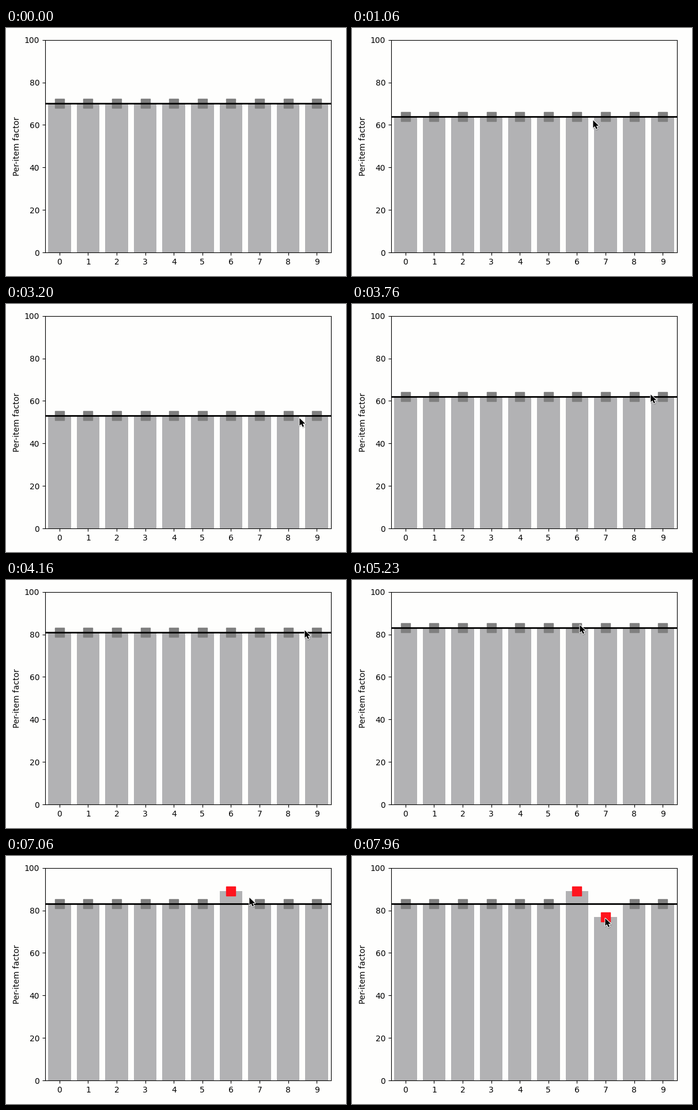
Recreate the animation shown at these times as a matplotlib script. Size 590x431 px, loop 8 s.

```python
import matplotlib.pyplot as plt
import numpy as np
from matplotlib.animation import FuncAnimation
from matplotlib.patches import Polygon

W, H, DPI = 590, 431, 100
LOOP, STEP = 8000, 20
PAPER, BAR, GREY, RED = "#fefefd", "#b2b2b4", "#808080", "#ff141e"

# Pointer path: time in ms, x, y in pixels from the top left
POINTER = np.array([
    (150, 600, 176), (200, 572, 174), (280, 500, 162), (360, 440, 144),
    (460, 417, 130), (600, 417, 130), (740, 417, 126), (860, 417, 133),
    (1060, 417, 159), (1300, 414, 186), (1360, 414, 190), (1930, 414, 190),
    (2000, 412, 190.6), (2330, 412, 190.6), (2450, 410, 196), (2600, 418, 208),
    (2750, 448, 216), (2900, 482, 213), (3130, 508, 197), (3200, 508, 197),
    (3450, 513, 190), (3760, 517, 156), (4000, 517, 107), (4110, 517, 89),
    (4230, 517, 81), (4560, 517, 81), (4660, 511, 84), (4850, 470, 90),
    (5030, 420, 86), (5230, 393, 77), (5360, 392, 76), (5400, 392, 76),
    (5700, 392, 72), (6000, 395, 60), (6160, 396, 57), (6490, 396, 57),
    (6500, 397, 57), (6860, 397, 57), (6940, 404, 61), (7060, 421, 71),
    (7200, 432, 82), (7460, 438, 91), (7700, 438, 91), (7960, 438, 107),
])

# Dragged values: time in ms, value
LEVEL = np.array([
    (600, 70), (700, 70.7), (780, 70.7), (860, 70), (960, 67.5), (1060, 64),
    (1200, 58.5), (1300, 55), (1360, 54), (1450, 54), (1460, 53),
    (3200, 53), (3240, 51), (3330, 51), (3480, 53), (3620, 57), (3760, 62),
    (4000, 72), (4110, 78.5), (4190, 82), (4230, 83),
])
SINGLE = {
    6: np.array([(5400, 83), (5440, 84), (5700, 85), (6000, 88), (6140, 89)]),
    7: np.array([(7700, 83), (7740, 81), (7800, 80), (7900, 78), (7950, 77)]),
}

ARROW = np.array([(1, 1), (1, 14), (4, 11.3), (6.3, 16.2), (8.6, 15.2),
                  (6.4, 10.5), (10.8, 10.5)])


def value_at(keys, t):
    return np.rint(np.interp(t, keys[:, 0], keys[:, 1]))


def pointer_at(t):
    return np.rint([np.interp(t, POINTER[:, 0], POINTER[:, k]) for k in (1, 2)])


# The small margin keeps float rounding from losing a pixel row
fig = plt.figure(figsize=((W + 0.01) / DPI, (H + 0.01) / DPI), dpi=DPI,
                 facecolor=PAPER)
ax = fig.add_axes([68 / W, 40.8 / H, 496 / W, 369.6 / H], facecolor=PAPER)
ax.set(xlim=(-0.5, 9.5), ylim=(0, 100), xticks=range(10),
       ylabel="Per-item factor")
bars = ax.bar(range(10), [70] * 10, width=0.8, color=BAR)
handles = [ax.plot([i], [70], "s", ms=12, color=GREY)[0] for i in range(10)]
level_line = ax.axhline(70, color="black", lw=2)

overlay = fig.add_axes([0, 0, 1, 1], xlim=(0, W), ylim=(H, 0))
overlay.axis("off")


def arrow_layer(offset, **style):
    patch = Polygon(ARROW, closed=True, joinstyle="round", **style)
    overlay.add_patch(patch)
    return patch, np.array(offset)


pointer = [
    arrow_layer((1, 1.8), fc="black", ec="black", lw=1.8, alpha=0.15),
    arrow_layer((0.4, 0.4), fc="white", ec="white", lw=1.5),
    arrow_layer((0.4, 0.4), fc="black", ec="none", lw=0),
]


def draw(frame):
    t = frame * STEP
    level = value_at(LEVEL, t)
    level_line.set_ydata([level, level])
    for i, (bar, handle) in enumerate(zip(bars, handles)):
        own = i in SINGLE and t >= SINGLE[i][0, 0]
        value = value_at(SINGLE[i], t) if own else level
        bar.set_height(value)
        handle.set_ydata([value])
        handle.set_color(GREY if value == level else RED)
    tip = pointer_at(t)
    for patch, offset in pointer:
        patch.set_xy(ARROW + tip + offset)
    return [*bars, *handles, level_line, *(patch for patch, _ in pointer)]


anim = FuncAnimation(fig, draw, frames=LOOP // STEP, interval=STEP,
                     repeat=True, repeat_delay=0)
plt.show()
```
